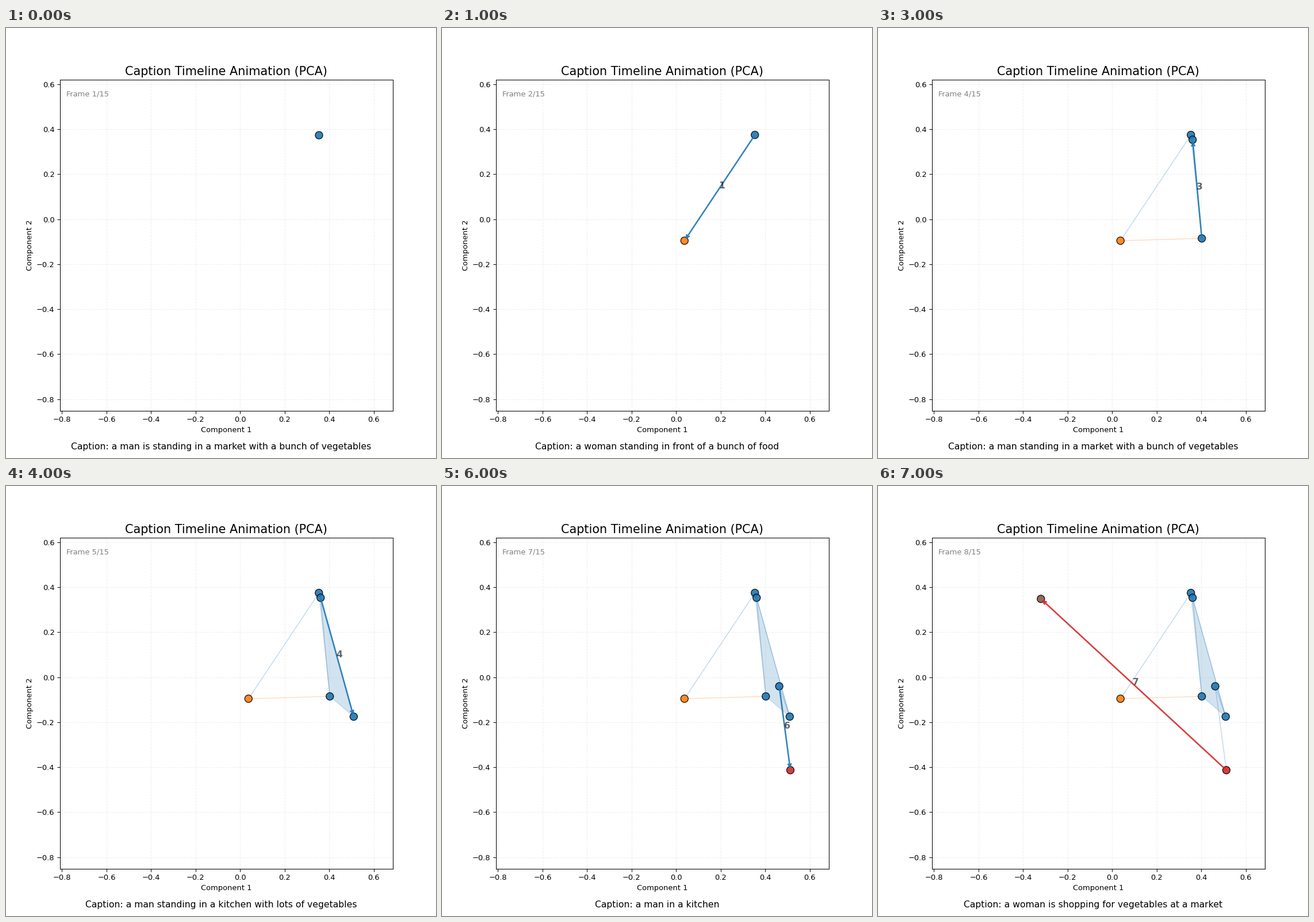
These frames come from a looping animation (748 px wide and 748 px high, 8000 ms). A matplotlib script:

```python
import matplotlib.pyplot as plt
from matplotlib.animation import FuncAnimation

plt.rcParams["font.family"] = "DejaVu Sans"

BLUE, ORANGE, RED, BROWN = "#1f77b4", "#ff7f0e", "#d62728", "#8c564b"
TOTAL = 15

# x, y, cluster colour, caption
STEPS = [
    (0.3537, 0.3745, BLUE, "a man is standing in a market with a bunch of vegetables"),
    (0.0374, -0.0955, ORANGE, "a woman standing in front of a bunch of food"),
    (0.4027, -0.0853, BLUE, "a man is standing in front of a bunch of vegetables"),
    (0.3614, 0.3530, BLUE, "a man standing in a market with a bunch of vegetables"),
    (0.5100, -0.1752, BLUE, "a man standing in a kitchen with lots of vegetables"),
    (0.4630, -0.0404, BLUE, "a man standing in a kitchen with vegetables"),
    (0.5130, -0.4130, RED, "a man in a kitchen"),
    (-0.3200, 0.3480, BROWN, "a woman is shopping for vegetables at a market"),
]
POINTS = [step[:2] for step in STEPS]
COLORS = [step[2] for step in STEPS]

fig, ax = plt.subplots(figsize=(8, 8), dpi=93.5)
ax.set_xlim(-0.8103, 0.6865)
ax.set_ylim(-0.8509, 0.6203)
ax.set_title("Caption Timeline Animation (PCA)", fontsize=16)
ax.set_xlabel("Component 1")
ax.set_ylabel("Component 2")
ax.grid(True, linestyle="--", alpha=0.2)

counter = ax.text(0.02, 0.95, "", transform=ax.transAxes, color="gray")
caption = fig.text(0.5, 0.02, "", ha="center", fontsize=12)
drawn = []


def half_hull(points):
    chain = []
    for x, y in points:
        while len(chain) > 1:
            (ax_, ay), (bx, by) = chain[-2:]
            if (bx - ax_) * (y - ay) - (by - ay) * (x - ax_) > 0:
                break
            chain.pop()
        chain.append((x, y))
    return chain[:-1]


def convex_hull(points):
    points = sorted(points)
    return half_hull(points) + half_hull(points[::-1])


def draw_cluster(color, count):
    members = [p for p, c in zip(POINTS[:count], COLORS) if c == color]
    if len(members) == 2:
        drawn.extend(ax.plot(*zip(*members), color=color, lw=2, alpha=0.4, zorder=1))
    elif len(members) > 2:
        drawn.extend(ax.fill(*zip(*convex_hull(members)), color=color,
                             alpha=0.2, zorder=1))


def draw_trail(i):
    drawn.extend(ax.plot(*zip(POINTS[i - 1], POINTS[i]), color=COLORS[i - 1],
                         lw=1, alpha=0.3, zorder=2))


def draw_arrow(i):
    (x0, y0), (x1, y1) = POINTS[i - 1], POINTS[i]
    props = dict(arrowstyle="->", color=COLORS[i - 1], lw=2, alpha=0.9)
    drawn.append(ax.annotate("", xy=(x1, y1), xytext=(x0, y0),
                             arrowprops=props, zorder=4))
    drawn.append(ax.text((x0 + x1) / 2 + 0.01, (y0 + y1) / 2 + 0.01, str(i),
                         fontsize=12, fontweight="bold", color="black",
                         alpha=0.6, ha="center", va="center", zorder=5))


def update(frame):
    while drawn:
        drawn.pop().remove()
    count = frame + 1
    for color in (BLUE, ORANGE, RED, BROWN):
        draw_cluster(color, count)
    for i in range(1, frame):
        draw_trail(i)
    xs, ys = zip(*POINTS[:count])
    drawn.append(ax.scatter(xs, ys, s=100, c=COLORS[:count], alpha=0.9,
                            edgecolors="black", linewidths=1, zorder=3))
    if frame:
        draw_arrow(frame)
    counter.set_text(f"Frame {count}/{TOTAL}")
    caption.set_text(f"Caption: {STEPS[frame][3]}")
    return drawn + [counter, caption]


anim = FuncAnimation(fig, update, frames=len(STEPS), interval=1000,
                     repeat=True, repeat_delay=0, blit=False)
plt.show()
```
